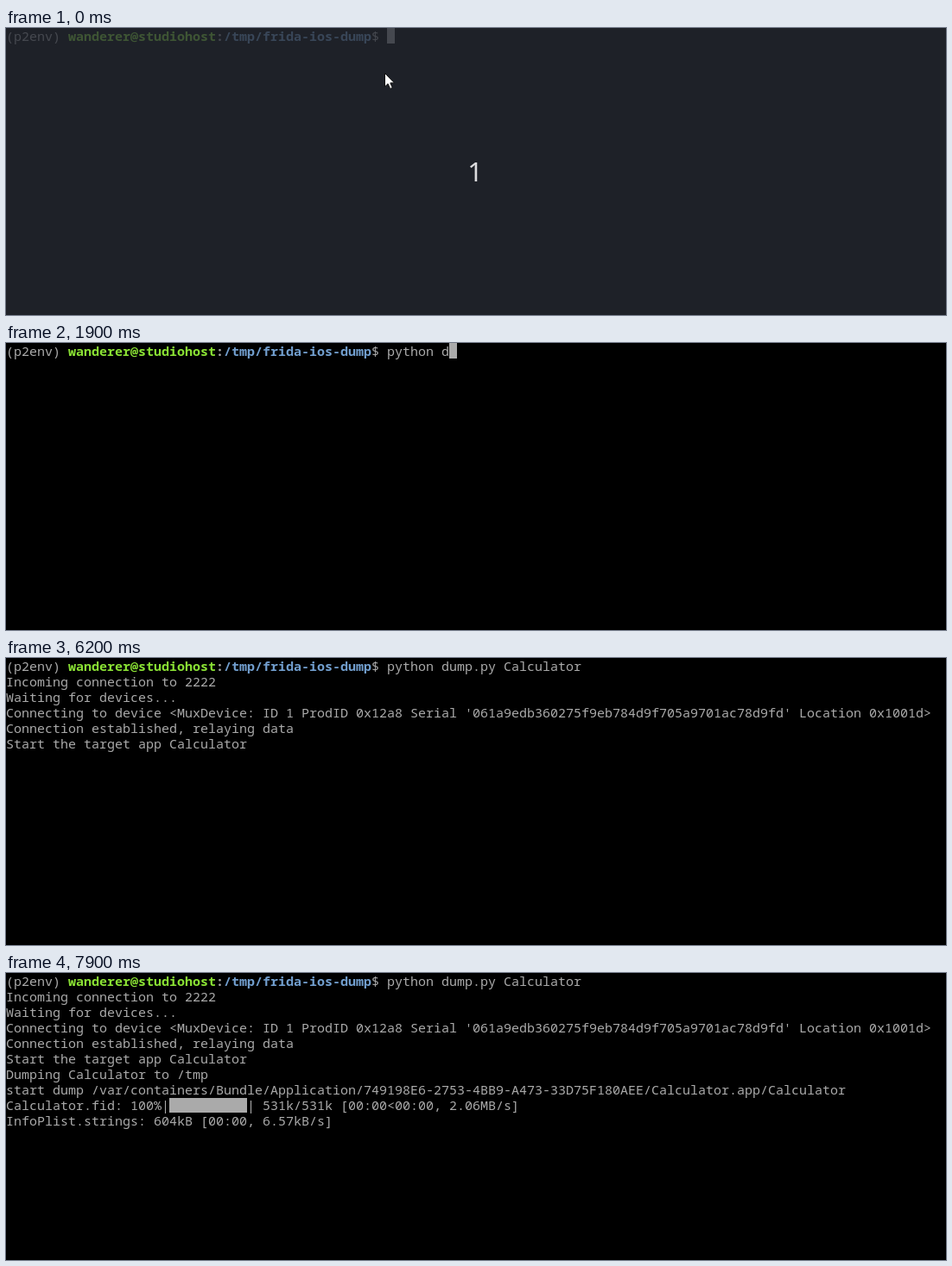
Animation, 1088 px wide and 333 px high, one loop 8000 ms. Source, as an HTML page:

```html
<!DOCTYPE html>
<html lang="en">
<head>
<meta charset="utf-8">
<title>Terminal session</title>
<style>
  html, body { margin: 0; width: 100%; height: 100%; overflow: hidden; background: #000; }
  svg { display: block; width: 1088px; height: 333px; }
  text { white-space: pre; fill: #aaa; font: 15px "Noto Sans Mono", "DejaVu Sans Mono", monospace; }
  .bold { font-weight: bold; }
  .user { fill: #8ae234; }
  .path { fill: #729fcf; }
  .block { fill: #aaa; }
  .count { fill: #dcdcde; font: 31px "Noto Sans", "Open Sans", sans-serif; text-anchor: middle; }
</style>
</head>
<body>
<svg viewBox="0 0 1088 333">
  <rect width="1088" height="333"/>
  <g id="screen">
    <text x="0" y="15">(p2env)</text>
    <text class="bold user" x="72" y="15">wanderer@studiohost</text>
    <text class="bold" x="243" y="15">:</text>
    <text class="bold path" x="252" y="15">/tmp/frida-ios-dump</text>
    <text x="423" y="15">$</text>
  </g>
  <rect id="bar" class="block" x="189" y="145" width="90" height="17"/>
  <rect id="caret" class="block" width="9" height="18"/>
  <path id="beam" d="M438 47.500h5M440.500 47v14M438 60.500h5" fill="none" stroke="#f0f0f0"/>
  <g id="countdown">
    <rect width="1088" height="333" fill="#282c34" opacity=".77"/>
    <text class="count" x="543" y="178">1</text>
    <path d="M438.500 52.500v15.500l3.600-3.300 2.600 5.800 2.600-1.200-2.500-5.500h4.700z" fill="#fff" stroke="#111"/>
  </g>
</svg>
<script>
const LOOP = 8000, CELL = 9, LINE = 18, PROMPT = 49, OFF = null;
const $ = id => document.getElementById(id);

const command = "python dump.py Calculator";
const connecting = [
  "Incoming connection to 2222",
  "Waiting for devices...",
  "Connecting to device <MuxDevice: ID 1 ProdID 0x12a8 Serial '061a9edb360275f9eb784d9f705a9701ac78d9fd' Location 0x1001d>",
  "Connection established, relaying data"
];
const dumpPath = "start dump /var/containers/Bundle/Application/749198E6-2753-4BB9-A473-33D75F180AEE/Calculator.app/Calculator";
const empty = "0.00B [00:00, ?B/s]";
const done = "Calculator.fid: 100%|" + " ".repeat(10) + "| 531k/531k [00:00<00:00, 2.06MB/s]";

// Each step: time, first row, its new lines, caret [row, column] or OFF
const type = (at, n) => [at, 0, [command.slice(0, n)], [0, PROMPT + n]];
const caret = (at, pos) => [at, 0, [], pos];
const steps = [
  caret(0, [0, PROMPT]),
  caret(400, OFF),
  type(900, 1), type(1000, 3), type(1100, 5), type(1300, 6), type(1500, 7),
  type(1900, 8), type(2000, 15),
  caret(2400, OFF), caret(2700, [0, PROMPT + 15]),
  type(3200, 25),
  caret(3400, [1, 0]),
  [3500, 1, connecting, [5, 0]],
  [3800, 5, ["Start the target app Calculator"], OFF],
  caret(4400, [6, 0]), caret(5500, OFF), caret(5600, [6, 0]), caret(6200, OFF),
  [6500, 6, ["Dumping Calculator to /tmp"], OFF],
  [6800, 7, [dumpPath, empty], [8, empty.length]],
  [6900, 8, [done], [8, done.length]],
  [7200, 9, [empty], [9, empty.length]],
  [7300, 9, ["CodeResources: 16.4kB [00:00, 148kB/s]"], [9, 38]],
  [7500, 9, ["Background_landscape_equals@2x~iphone.png: 131kB [00:00, 412kB/s]"], OFF],
  [7600, 9, ["Button_landscape_memory@2x.png: 262kB [00:00, 655kB/s]"], OFF],
  [7700, 9, ["Background_portrait@2x.png: 524kB [00:00, 874kB/s]"], OFF],
  [7900, 9, ["InfoPlist.strings: 604kB [00:00, 6.57kB/s]"], OFF]
];

const rows = Array.from({ length: 10 }, (_, i) => {
  const row = document.createElementNS("http://www.w3.org/2000/svg", "text");
  row.setAttribute("x", i ? 0 : PROMPT * CELL);
  row.setAttribute("y", i * LINE + 15);
  return $("screen").appendChild(row);
});

const show = (id, on) => { $(id).style.display = on ? "" : "none"; };

function draw(t) {
  const lines = rows.map(() => "");
  let pos = OFF;
  for (const [at, first, text, next] of steps) {
    if (at > t) break;
    text.forEach((line, i) => { lines[first + i] = line; });
    pos = next;
  }
  rows.forEach((row, i) => {
    if (row.textContent !== lines[i]) row.textContent = lines[i];
  });
  show("caret", pos);
  if (pos) {
    $("caret").setAttribute("x", pos[1] * CELL);
    $("caret").setAttribute("y", pos[0] * LINE);
  }
  show("bar", t >= 6900);
  show("beam", t >= 400 && t < 900);
  show("countdown", t < 400);
}

const start = performance.now();
function tick() {
  draw((performance.now() - start) % LOOP);
  requestAnimationFrame(tick);
}
tick();
</script>
</body>
</html>
```
